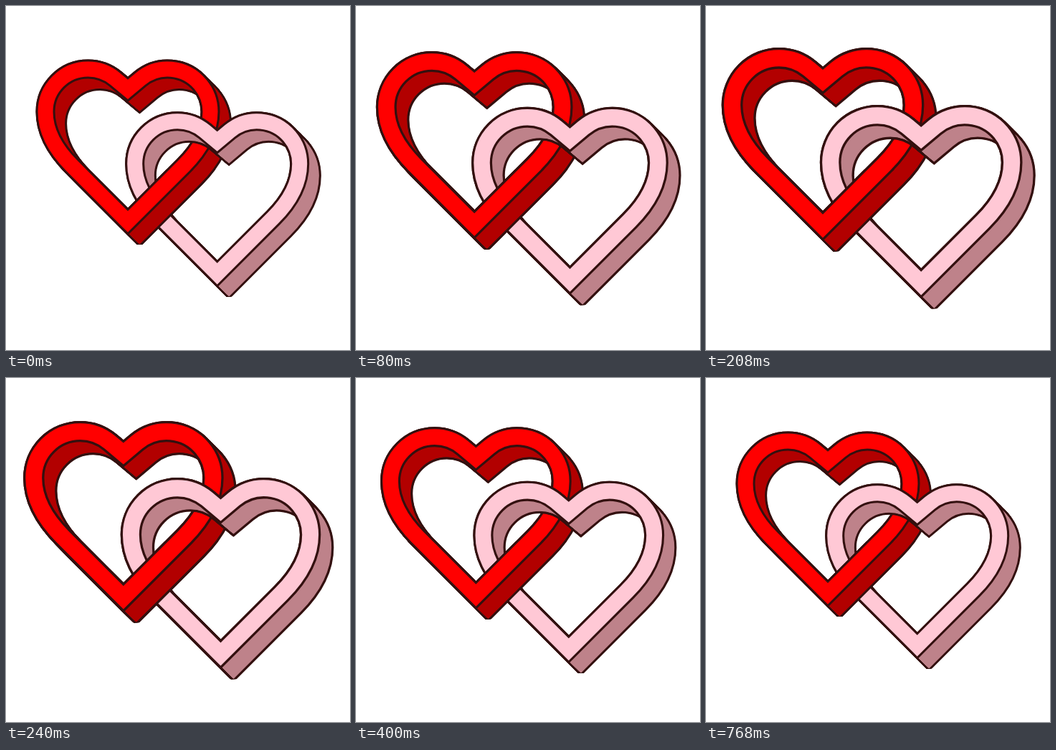
Animation, 480 px wide and 480 px high, one loop 0.96 s. Source, as an HTML page with a canvas:

```html
<!DOCTYPE html>
<html lang="en">
<head>
<meta charset="utf-8">
<title>Linked hearts</title>
<style>
html, body { margin: 0; width: 100%; height: 100%; overflow: hidden; background: #fff; }
canvas { display: block; width: 480px; height: 480px; }
</style>
</head>
<body>
<canvas></canvas>
<script>
const SIZE = 480, MID = SIZE / 2, STEP = 80, LOOP = 960;
const BEAT = [1, 1.069, 1.1, 1.088, 1.076, 1.038, 1];
const BAND = 24, LINE = 3, DEPTH = 16.6, INK = '#33100f';

const canvas = document.querySelector('canvas');
const ctx = canvas.getContext('2d');
const ratio = window.devicePixelRatio || 1;
canvas.width = canvas.height = SIZE * ratio;

// Middle line of the band, centred on x = 0
const LOBE = { x: 55.5, y: 147.5, r: 59.5 };
const SLANT = 50 * Math.PI / 180;
const heart = new Path2D();
heart.moveTo(0, 301);
heart.lineTo(-78, 223);
heart.bezierCurveTo(-94, 207, -115, 180, -115, LOBE.y);
heart.arc(-LOBE.x, LOBE.y, LOBE.r, Math.PI, 2 * Math.PI - SLANT);
heart.lineTo(0, 116.4);
heart.arc(LOBE.x, LOBE.y, LOBE.r, Math.PI + SLANT, 2 * Math.PI);
heart.bezierCurveTo(115, 180, 94, 207, 78, 223);
heart.closePath();

function band(width, color, shift = 0) {
  ctx.save();
  ctx.translate(shift, shift);
  ctx.lineWidth = width;
  ctx.strokeStyle = color;
  ctx.stroke(heart);
  ctx.restore();
}

function sweep(width, color) {
  for (let i = 0; i <= 32; i++) band(width, color, DEPTH * i / 32);
}

function clipBox(x, y, w, h) {
  ctx.beginPath();
  ctx.rect(x, y, w, h);
  ctx.clip();
}

function drawHeart(x, y, face, side) {
  ctx.save();
  ctx.translate(x, y);
  clipBox(-200, 0, 400, 333);   // blunt tip
  sweep(BAND + LINE, INK);
  sweep(BAND - LINE, side);
  band(BAND + LINE, INK);
  band(BAND - LINE, face);
  ctx.restore();
}

const drawRed = () => drawHeart(170, 0, '#ff0000', '#b20000');
const drawPink = () => drawHeart(294.7, 72.7, '#ffc8d5', '#be828a');

function zoom(scale) {
  ctx.translate(MID, MID);
  ctx.scale(scale, scale);
  ctx.translate(-MID, -MID);
}

function frame(now) {
  const step = Math.floor(now % LOOP / STEP);
  const scale = BEAT[Math.min(step, BEAT.length - 1)];
  ctx.setTransform(ratio, 0, 0, ratio, 0, 0);
  ctx.fillStyle = '#fff';
  ctx.fillRect(0, 0, SIZE, SIZE);

  ctx.save();
  zoom(scale);
  drawRed();
  drawPink();
  ctx.restore();

  // Red passes back over pink at the lower crossing
  ctx.save();
  clipBox(0, 228, SIZE, SIZE);
  zoom(scale);
  drawRed();
  ctx.restore();
}

let start;
function tick(now) {
  start ??= now;
  frame(now - start);
  requestAnimationFrame(tick);
}
frame(0);
requestAnimationFrame(tick);
</script>
</body>
</html>
```
